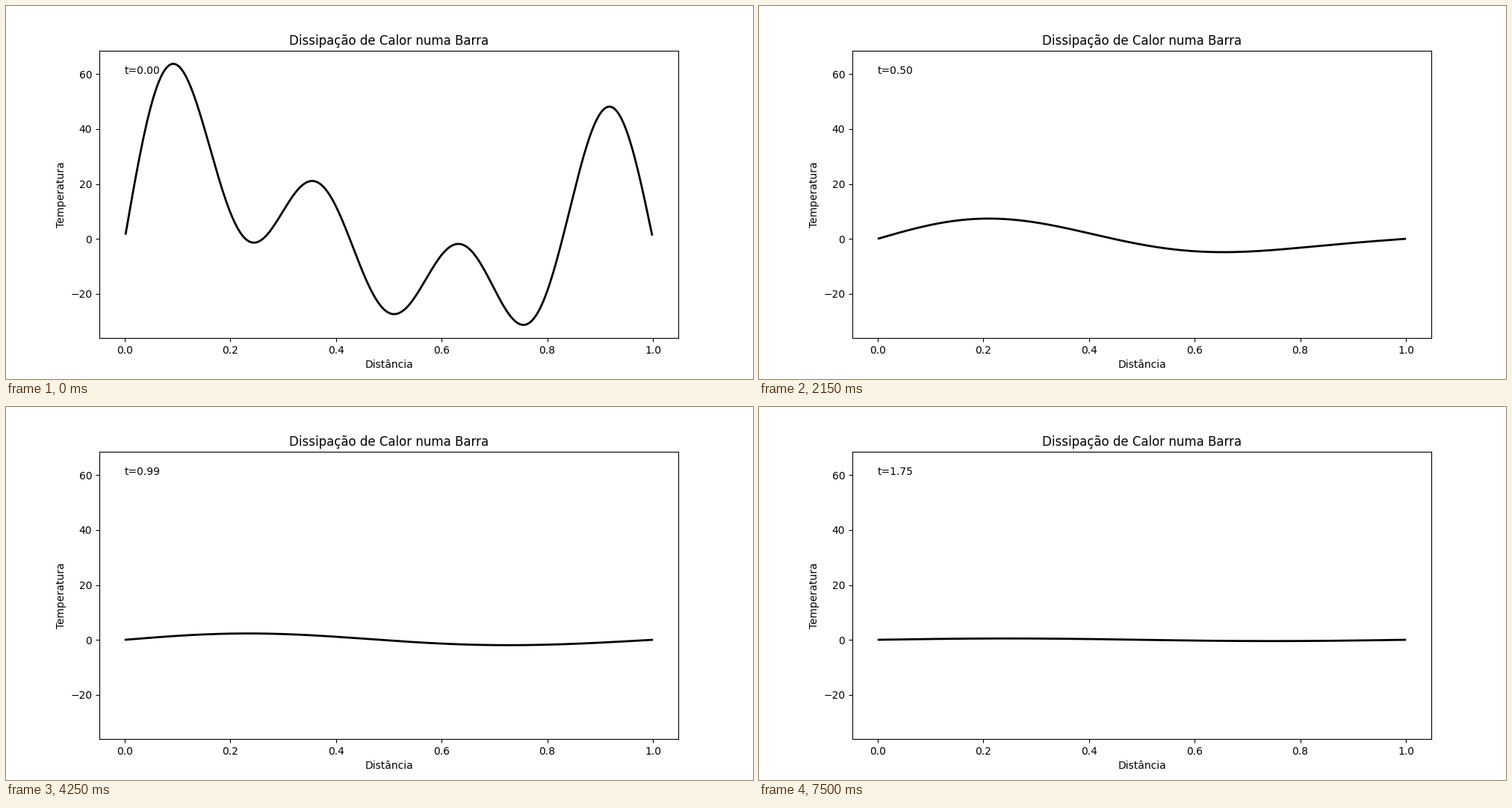
Recreate the animation shown at these times as a matplotlib script. Size 1000x500 px, loop 7550 ms.

```python
import numpy as np
import matplotlib.pyplot as plt
from matplotlib.animation import FuncAnimation

FRAMES = 151
INTERVAL = 50          # ms
T_END = 1.75
ALPHA = 0.05           # thermal diffusivity
CELLS = 300
MODES = {2: 15, 3: 20, 5: 18, 7: 25}   # sine mode: amplitude

dx = 1 / CELLS
x = (np.arange(CELLS) + 0.5) * dx


def temperature(t):
    """Heat equation on a unit bar with both ends held at zero."""
    return sum(a * np.exp(-ALPHA * (k * np.pi) ** 2 * t) * np.sin(k * np.pi * x)
               for k, a in MODES.items())


fig, ax = plt.subplots(figsize=(10, 5), dpi=100)
line, = ax.plot(x, temperature(0), color="black", linewidth=2)
ax.set_title("Dissipação de Calor numa Barra")
ax.set_xlabel("Distância")
ax.set_ylabel("Temperatura")
label = ax.text(0, 60, "t=0.00")

# Keep the limits fitted to the initial profile.
ax.set_xlim(ax.get_xlim())
ax.set_ylim(ax.get_ylim())


def update(i):
    t = T_END * i / (FRAMES - 1)
    line.set_ydata(temperature(t))
    label.set_text(f"t={t:.2f}")
    return line, label


anim = FuncAnimation(fig, update, frames=FRAMES, interval=INTERVAL,
                     repeat=True, repeat_delay=0)
plt.show()
```
